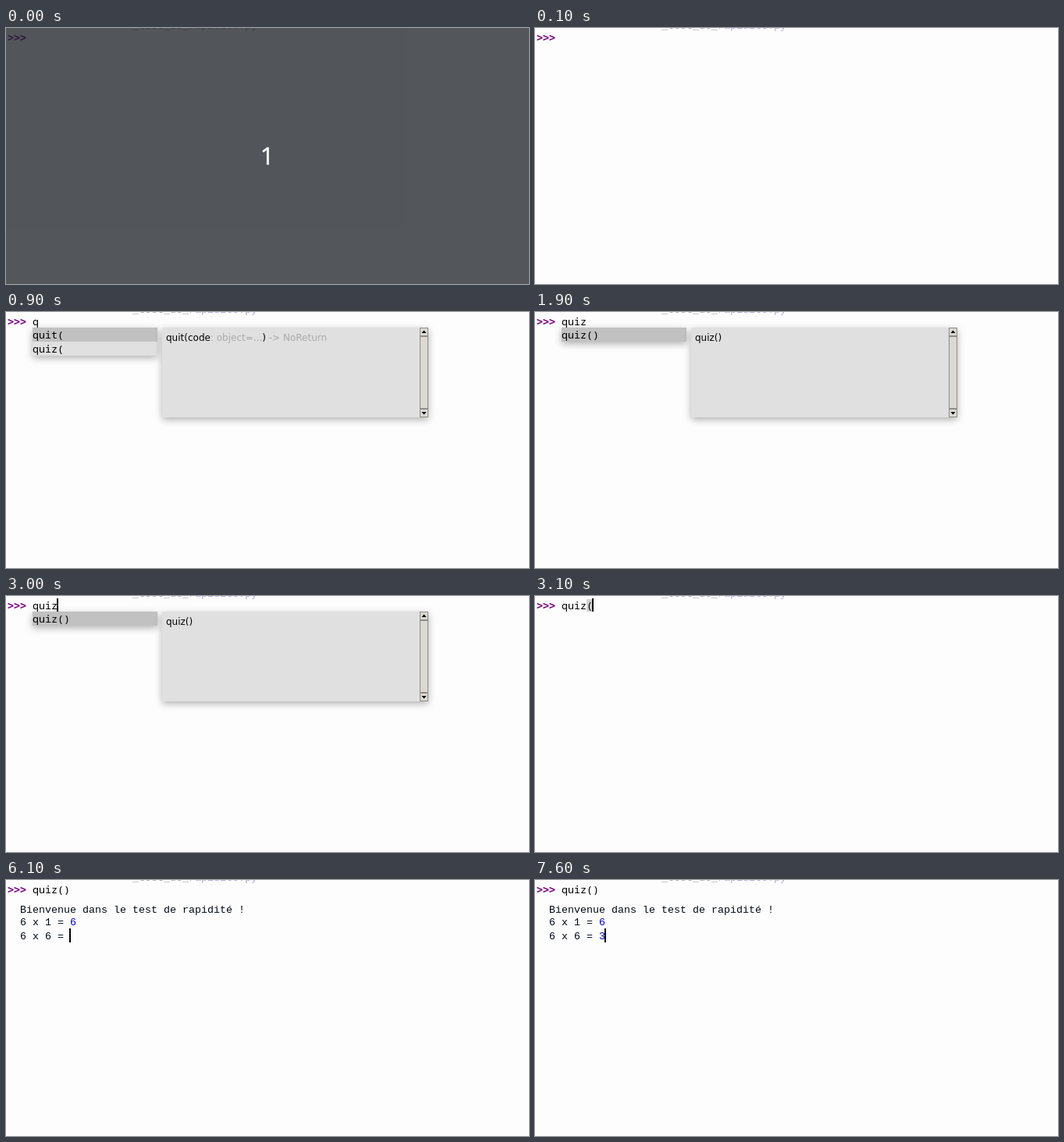
Write an HTML page that moves like this. It is 670 px wide and 328 px high and loops after 8 s.

```html
<!DOCTYPE html>
<html lang="fr">
<head>
<meta charset="utf-8">
<title>Quiz</title>
<style>
  html, body { margin: 0; width: 100%; height: 100%; overflow: hidden; background: #fdfdfd; }
  svg { display: block; }
  text { white-space: pre; }
  .code { font: 13.33px "Noto Sans Mono", "DejaVu Sans Mono", monospace; }
  .prompt { font: bold 13.33px "DejaVu Sans Mono", monospace; fill: #7f007f; }
  .out { font: 13.33px "Liberation Mono", monospace; fill: #000a14; }
  .in { fill: #0000e6; }
  .doc { font: 12px "DejaVu Sans", sans-serif; }
  .dim { fill: #a9a9a9; }
  .lav { fill: #b3aadb; }
  .panel { fill: #e0e0e0; filter: drop-shadow(0 3px 5px rgba(0, 0, 0, .3)); }
  .sel { fill: #c1c1c1; }
  .bar rect { fill: #dad9d3; stroke: #8f8d86; }
  .count { font: 31px "Open Sans", "Noto Sans", sans-serif; fill: #fff; stroke: #fff; stroke-width: .5; }
  [data-on] { visibility: hidden; }
</style>
</head>
<body>
<svg id="stage" width="670" height="328" viewBox="0 0 670 328">
  <text class="out dim" x="162" y="1">_test_de_<tspan class="lav">rapidite.py</tspan></text>
  <text class="prompt" x="2" y="17">&gt;&gt;&gt;</text>
  <rect x="66" y="4" width="8" height="16" fill="#d3d3d3" data-on="3100 3300"/>
  <g id="typed" class="code"></g>

  <g data-on="900 3100">
    <rect class="panel" x="34" y="20" width="160" height="36" data-on="900 1900"/>
    <rect class="panel" x="34" y="20" width="160" height="18" data-on="1900 3100"/>
    <rect class="sel" x="34" y="20" width="160" height="18"/>
    <rect class="panel" x="200" y="20" width="341" height="115"/>
    <g class="code" data-on="900 1900">
      <text x="34" y="34">quit(</text>
      <text x="34" y="52">quiz(</text>
      <text class="doc" x="205" y="37">quit(code<tspan class="dim">: object=...</tspan>)<tspan class="dim"> -&gt; NoReturn</tspan></text>
    </g>
    <g class="code" data-on="1900 3100">
      <text x="34" y="34">quiz()</text>
      <text class="doc" x="205" y="37">quiz()</text>
    </g>
    <g class="bar">
      <rect x="530.5" y="20.5" width="10" height="10"/>
      <rect x="530.5" y="31.5" width="10" height="92"/>
      <rect x="530.5" y="124.5" width="10" height="10"/>
      <path d="M532.5 27h6l-3-3.5zM532.5 128h6l-3 3.5z"/>
    </g>
  </g>

  <g class="out" data-on="3600 8000">
    <text x="18" y="42">Bienvenue dans le test de rapidité !</text>
    <text x="18" y="60" data-on="3600 6000">6 x 1 = <tspan class="in" data-on="5400 6000">6</tspan></text>
    <text x="18" y="58" data-on="6000 8000">6 x 1 = <tspan class="in">6</tspan></text>
    <text x="18" y="76" data-on="6100 8000">6 x 6 = <tspan class="in" data-on="7600 8000">3</tspan></text>
  </g>

  <rect id="caret" width="2"/>

  <g data-on="0 100">
    <rect width="670" height="328" fill="#1a1f26" fill-opacity=".75"/>
    <text class="count" x="325.8" y="175">1</text>
  </g>
</svg>
<script>
const LOOP = 8000;
const COL = 8;

// Keystrokes at the prompt: [character, time]
const keys = [["q", 700], ["u", 1500], ["i", 1600], ["z", 1800], ["(", 3100], [")", 3200]];
document.getElementById("typed").innerHTML = keys
  .map(([ch, at], i) => `<text x="${34 + i * COL}" y="17" data-on="${at} ${LOOP}">${ch}</text>`)
  .join("");

// Caret stops: [time, line, column]; a bare time hides it
const lines = [{ y: 3, h: 17, x: 33 }, { y: 46, h: 18, x: 17 }, { y: 62, h: 18, x: 17 }];
const stops = [
  [0], [200, 0, 0], [700, 0, 1], [900], [1200, 0, 1], [1500, 0, 2], [1600, 0, 3], [1800],
  [2100, 0, 4], [2700], [3000, 0, 4], [3100, 0, 5], [3200, 0, 6], [3500],
  [3800, 1, 8], [4500], [4700, 1, 8], [5400], [5700, 1, 9], [6000],
  [6100, 2, 8], [6300], [6600, 2, 8], [7200], [7500, 2, 8], [7600, 2, 9]
];
const caret = document.getElementById("caret");

const timed = [...document.querySelectorAll("[data-on]")].map(el => {
  const [from, to] = el.dataset.on.split(" ").map(Number);
  return { el, from, to };
});

function placeCaret(t) {
  const [, row, col] = stops.findLast(([at]) => at <= t);
  const line = lines[row];
  caret.style.visibility = line ? "visible" : "hidden";
  if (!line) return;
  caret.setAttribute("x", line.x + col * COL);
  caret.setAttribute("y", line.y);
  caret.setAttribute("height", line.h);
}

const start = performance.now();
function draw() {
  const t = (performance.now() - start) % LOOP;
  for (const { el, from, to } of timed) {
    el.style.visibility = t >= from && t < to ? "visible" : "hidden";
  }
  placeCaret(t);
  requestAnimationFrame(draw);
}
draw();
</script>
</body>
</html>
```
